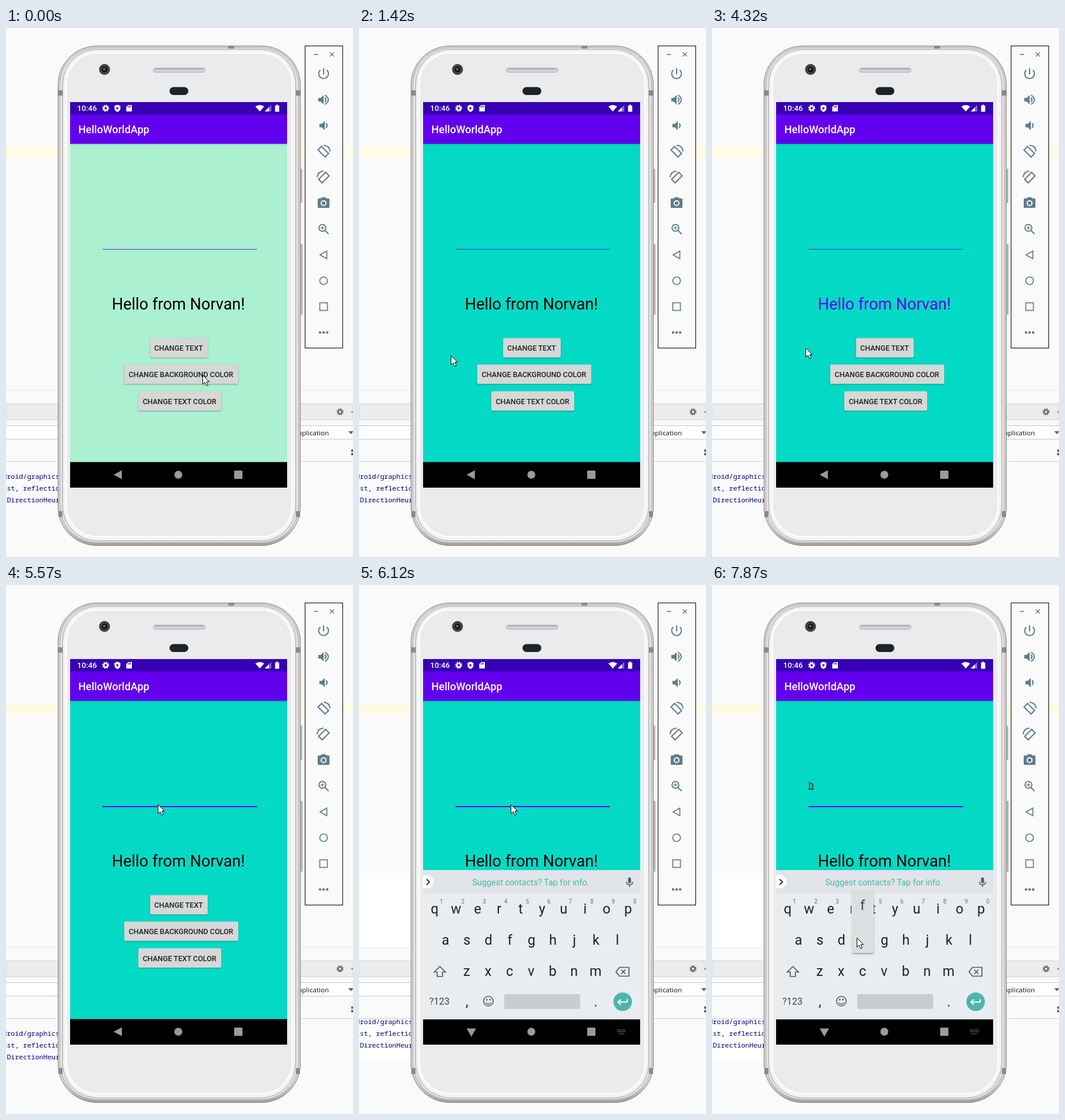
An HTML page that plays this animation: 590 px wide and 900 px high, repeating every 7.99 s.

```html
<!DOCTYPE html>
<html lang="en">
<head>
<meta charset="utf-8">
<title>HelloWorldApp</title>
<style>
html, body { margin: 0; width: 100%; height: 100%; overflow: hidden; background: #fafafa; }
svg { display: block; width: 590px; height: 900px; }
text { font-family: Roboto, sans-serif; white-space: pre; }
.mid { text-anchor: middle; }
.bold { font-weight: 500; }
.line { fill: none; stroke-width: 2; }
.code text { font: 500 11.5px "Noto Sans Mono", monospace; fill: #000080; }
.tools { fill: #607d8b; stroke: #607d8b; stroke-width: 0; }
.tools .line { fill: none; stroke-width: 2; }
.btn text { font-size: 12.5px; font-weight: 500; fill: #212121; text-anchor: middle; }
.keys text { font-size: 23.3px; fill: #14242c; text-anchor: middle; }
.keys .digit { font-size: 10px; fill: #667177; }
#typed { text-decoration: underline 1px; text-underline-offset: 2px; }
</style>
</head>
<body>
<svg viewBox="0 0 590 900">
  <defs>
    <g id="gear" fill="none" stroke="currentColor">
      <circle r="3.3" stroke-width="2.6"/>
      <circle r="5" stroke-width="2" stroke-dasharray="2 1.927"/>
    </g>
    <g id="rotate">
      <path class="line" d="M-3.500 -8.500L8.500 3.500L2.500 9.500L-9.500 -2.500Z"/>
      <path class="line" d="M0 -10.500Q10 -10 11 0"/>
    </g>
    <path id="speaker" d="M-7 -3h4l5 -5v16l-5 -5h-4z"/>
    <filter id="soft" x="-20%" y="-20%" width="140%" height="150%"><feGaussianBlur stdDeviation="1"/></filter>
    <filter id="softer" x="-20%" y="-20%" width="140%" height="160%"><feGaussianBlur stdDeviation="2.2"/></filter>
    <linearGradient id="fade" x2="0" y2="1"><stop stop-opacity=".18"/><stop offset="1" stop-opacity="0"/></linearGradient>
    <linearGradient id="rim" x2="0" y2="1"><stop offset=".96" stop-color="#d5d1d1"/><stop offset="1" stop-color="#a5a0a0"/></linearGradient>
    <clipPath id="console"><rect y="738" width="100" height="162"/></clipPath>
  </defs>

  <!-- editor behind the phone -->
  <rect width="590" height="900" fill="#fafafa"/>
  <rect y="202" width="590" height="18" fill="#fffae3"/>
  <g id="pane" fill="#fff"><rect y="490" width="95" height="126"/><rect y="738" width="100" height="69"/></g>
  <rect y="616" width="590" height="1" fill="#e8e8e8"/>
  <rect y="639.5" width="590" height="27" fill="#ececec" stroke="#d0d0d0"/>
  <rect x="-5" y="676.5" width="600" height="23" fill="#fff" stroke="#c6c6c6"/>
  <rect y="737" width="590" height="1" fill="#d0d0d0"/>
  <use href="#gear" x="568" y="653" color="#6e6e6e"/>
  <path d="M587 652.500h3v1.500h-3zM582 686h9l-4.500 5zM587 717h3v4h-3zM587 723h3v4h-3z" fill="#5f5f5f"/>
  <text x="549" y="693" text-anchor="end" font-size="11.500" style="font-family:'Open Sans',sans-serif" fill="#111">Application</text>
  <g clip-path="url(#console)"><g id="code" class="code">
    <text x="-5.500" y="767">droid/graphics</text>
    <text x="-5.500" y="787">ist, reflectio</text>
    <text x="-5.500" y="807">tDirectionHeur</text>
  </g></g>

  <!-- phone body -->
  <path d="M500 240h3v57h-3zM500 368h3.500v119h-3.500z" fill="#bdb9b9" stroke="#8b8787" stroke-width=".7"/>
  <rect x="88.500" y="30.500" width="412" height="850" rx="66" fill="url(#rim)" stroke="#8a8585"/>
  <rect x="91.500" y="33.500" width="406" height="842" rx="63" fill="#e2dfdf" stroke="#b5b0b0"/>
  <rect x="96.500" y="36.500" width="396" height="836" rx="59" fill="#f3f3f4" stroke="#aaa6a6"/>
  <rect x="102.500" y="42.500" width="384" height="823" rx="53" fill="#e9ebed" stroke="#fff" stroke-width="2"/>
  <path d="M89 106h7v9h-7zM493 106h7v9h-7zM89 822h7v10h-7zM493 822h7v10h-7zM378 31h10v4h-10z" fill="#8d8989"/>
  <circle cx="167.500" cy="70.500" r="9.300" fill="#3a3b3d"/>
  <circle cx="167.500" cy="70.500" r="6" fill="#18191b" stroke="#66686b"/>
  <circle cx="167" cy="70" r="2.200" fill="#5d6668"/>
  <rect x="250.500" y="68" width="88" height="7.500" rx="3.700" fill="#d0d1d5" stroke="#b4b5ba"/>
  <path d="M253 69.500h83" stroke="#94959b"/>
  <rect x="278" y="100.500" width="32" height="13.500" rx="6.700" fill="#1f2326"/>

  <!-- app -->
  <rect id="page" x="109" y="197" width="369" height="542"/>
  <rect x="109" y="197" width="369" height="3" fill="url(#fade)"/>
  <rect x="109" y="126" width="369" height="21" fill="#3700b3"/>
  <rect x="109" y="147" width="369" height="50" fill="#6200ee"/>
  <g fill="#fff">
    <text x="121" y="141" font-size="13.200" class="bold">10:46</text>
    <text x="123" y="179" font-size="18" class="bold">HelloWorldApp</text>
    <use href="#gear" x="169.500" y="136.500" color="#fff"/>
    <path d="M189.500 130.500l5 2v4q0 4.500 -5 6.500q-5 -2 -5 -6.500v-4z"/>
    <path d="M188 134l4 2.600l-4 2.600z" fill="#3700b3"/>
    <path d="M208 131h6v11h-9.500v-7.500z"/>
    <path d="M207.500 133v2.500M209.500 132v3.500M211.500 132v3.500" stroke="#3700b3"/>
    <path d="M424 133.500q7.500 -5 15 0l-7.500 8.500z"/>
    <path d="M451 131v11h-11z" opacity=".4"/><path d="M447 135v7h-7z"/>
    <path d="M457.500 132h2v-1.500h3v1.500h2v10.500h-7z"/>
  </g>
  <rect id="rule" x="164" y="376" width="263" fill="#6200ee"/>
  <text id="typed" x="164" y="345.500" font-size="16.200" fill="#212121">h</text>
  <text id="hello" x="179.900" y="479" font-size="27">Hello from Norvan!</text>
  <g id="buttons"></g>

  <!-- navigation bar -->
  <rect x="109" y="738.500" width="369" height="43.500" fill="#000"/>
  <g fill="#9a9a9a">
    <path id="back" d="M183 760l14 -7.500v15z"/>
    <path id="down" d="M183 754.500h16l-8 14z"/>
    <circle cx="293" cy="760" r="6.700"/>
    <rect x="388" y="753" width="14" height="14" rx="1"/>
    <path id="switch" d="M439.500 757h14M439.500 760h14M442 763.500h9" stroke="#8a8a8a" stroke-width="1.600" stroke-dasharray="1.600 1.400"/>
  </g>

  <!-- keyboard -->
  <g id="keyboard">
    <rect x="109" y="485" width="369" height="254" fill="#e9edf0"/>
    <rect x="109" y="485" width="369" height="40" fill="#e1e4e8"/>
    <path d="M109 494h7a11 11 0 0 1 0 22h-7z" fill="#fff"/>
    <path class="line" d="M115 500.500l4.800 4.800l-4.800 4.800" stroke="#263238"/>
    <text class="mid" x="292" y="511" font-size="14.370" fill="#46b5a7">Suggest contacts? Tap for info.</text>
    <g stroke="#4f5b62" class="line">
      <rect x="457.500" y="497.500" width="5" height="10" rx="2.500" fill="#4f5b62" stroke="none"/>
      <path d="M454.700 505q0 5 5.300 5t5.300 -5M460 510v3.500" stroke-width="1.600"/>
      <path d="M137.500 649l-9.500 9.500h5v7.500h9v-7.500h5z" stroke-width="1.700"/>
      <path d="M443 650.500h16v15h-16l-6 -7.500zM446 654.500l7 7M453 654.500l-7 7" stroke-width="1.700"/>
      <circle cx="220" cy="708" r="8.200" stroke-width="1.600"/>
      <path d="M215.500 710.500q4.500 5 9 0" stroke-width="1.600"/>
      <path d="M216 705.500h2.500M221.500 705.500h2.500" stroke-width="2.500"/>
    </g>
    <rect x="247" y="696" width="129" height="25.500" rx="2.500" fill="#c8cdd1"/>
    <circle cx="448.300" cy="709" r="15.800" fill="#4db6ac"/>
    <path class="line" d="M456 704.500v5h-15M445 705l-4.500 4.500l4.500 4.500" stroke="#fff"/>
    <text x="119.500" y="714" font-size="16" fill="#37474f">?123</text>
    <g id="keys" class="keys"></g>
  </g>
  <g id="popup" class="keys">
    <rect id="popShade" x="-18" width="37" rx="3" fill="#000" opacity=".3" filter="url(#soft)"/>
    <rect id="popBox" x="-19" width="38" rx="3" fill="#dcdee0"/>
    <text id="popKey" y="553" style="fill:#42474a"></text>
  </g>

  <!-- emulator toolbar -->
  <rect x="508.500" y="30.500" width="64" height="514" fill="#fafafa" stroke="#000"/>
  <path class="line" d="M523.500 45h7M550.500 41.500l7 7M557.500 41.500l-7 7" stroke="#607078" style="stroke-width:1.300"/>
  <g class="tools">
    <g transform="translate(540 78)"><path class="line" d="M0 -9.500V1M-5.500 -6.500A8.300 8.300 0 1 0 5.500 -6.500"/></g>
    <g transform="translate(538 122)"><use href="#speaker"/><path class="line" d="M4 -4q4 4 0 8M4.500 -8q11 8 0 16"/></g>
    <g transform="translate(540 166)"><use href="#speaker"/><path class="line" d="M4 -4q4 4 0 8"/></g>
    <use href="#rotate" transform="translate(540 210)"/>
    <use href="#rotate" transform="translate(540 254) scale(-1 1)"/>
    <g transform="translate(540 298)">
      <path d="M-10 -6.500q0 -1.500 1.500 -1.500h3.500l2 -2h6l2 2h3.500q1.500 0 1.500 1.500v13q0 1.500 -1.500 1.500h-17q-1.500 0 -1.500 -1.500z"/>
      <circle r="4.100" fill="#607d8b" style="stroke:#fafafa;stroke-width:2"/>
    </g>
    <g transform="translate(538 340)"><circle class="line" r="5.800"/><path class="line" d="M4.500 4.500l6 6"/><path class="line" d="M-3 0h6M0 -3v6" style="stroke-width:1.300"/></g>
    <path class="line" d="M534 386l11.500 -6.500v13z" style="stroke-width:1.700"/>
    <circle class="line" cx="540" cy="430" r="6.500" style="stroke-width:1.700"/>
    <rect class="line" x="533.500" y="467.500" width="13" height="13" style="stroke-width:1.700"/>
    <circle cx="534" cy="518" r="2.200"/><circle cx="540" cy="518" r="2.200"/><circle cx="546" cy="518" r="2.200"/>
  </g>

  <path id="cursor" d="M.5 .5V16.200L4.200 12.800L6.800 18.600L9.500 17.400L6.900 11.800H11.600Z" fill="#fff" stroke="#000"/>
</svg>
<script>
const LOOP = 7990;
const $ = id => document.getElementById(id);
const set = (id, attrs) => { for (const k in attrs) $(id).setAttribute(k, attrs[k]); };
const show = (id, on) => set(id, { display: on ? 'inline' : 'none' });

const button = (id, label, x, y, w) => `<g class="btn">
  <rect id="${id}Shade" x="${x}" y="${y + 1}" width="${w}" height="33" rx="2" opacity=".32" filter="url(#soft)"/>
  <rect id="${id}" x="${x}" y="${y}" width="${w}" height="33" rx="2" fill="#d6d7d7"/>
  <text x="${x + w / 2 - .5}" y="${y + 21.5}">${label}</text></g>`;
$('buttons').innerHTML =
  button('words', 'CHANGE TEXT', 245, 527.5, 98) +
  button('back-color', 'CHANGE BACKGROUND COLOR', 201, 572.5, 194) +
  button('ink', 'CHANGE TEXT COLOR', 225, 618, 141);

const STEP = 36.55;
const row = (chars, x, y, cls = '') => [...chars].map((c, i) =>
  `<text class="${cls}" x="${x + i * STEP}" y="${y}">${c}</text>`).join('');
$('keys').innerHTML = row('qwertyuiop', 128.5, 559) + row('1234567890', 140, 541.5, 'digit') +
  row('asdfghjkl', 147, 612) + row('zxcvbnm', 183, 665) + row(',', 183.5, 717) + row('.', 402.5, 717);

// Each entry: start time, pointer x, pointer y
const pointer = [
  [0, 334, 590], [150, 333, 590], [680, 331, 587], [830, 167, 557], [980, 156, 557],
  [2380, 179, 566], [2530, 300, 626], [2680, 301, 627], [2830, 302, 630], [2980, 302, 634],
  [3810, 298, 632], [3960, 268, 612], [4080, 205, 572], [4200, 168, 549], [4320, 159, 544],
  [5030, 165, 530], [5180, 205, 430], [5300, 248, 357], [5420, 258, 372], [5570, 258, 373],
  [6430, 275, 420], [6550, 325, 520], [6670, 346, 568], [6790, 328, 580],
  [6940, 327, 585], [7060, 326, 588], [7210, 328, 594], [7330, 333, 601], [7450, 335, 605],
  [7750, 290, 603], [7870, 246, 600]
];
const current = (track, t) => track.findLast(k => k[0] <= t);

function draw(t) {
  const [, x, y] = current(pointer, t);
  set('cursor', { transform: `translate(${x} ${y})` });
  set('page', { fill: t < 1420 ? '#aaf0d1' : '#03dac5' });
  set('hello', { fill: t >= 2980 && t < 4750 ? '#6200ee' : '#000' });

  const lifted = t >= 2980 && t < 3100;
  set('ink', { fill: lifted ? '#bdbdbd' : t >= 3100 && t < 3250 ? '#c6c7c7' : '#d6d7d7' });
  set('inkShade', { filter: lifted ? 'url(#softer)' : 'url(#soft)', y: lifted ? 621 : 619 });

  const focused = t >= 5570;
  set('rule', { height: focused ? 2 : 1, opacity: focused ? 1 : .8 });

  const open = t >= 6000, sliding = t < 6120;
  for (const id of ['keyboard', 'down', 'switch', 'pane']) show(id, open);
  show('back', !open);
  set('keyboard', { transform: `translate(0 ${sliding ? 7 : 0})`, opacity: sliding ? .87 : 1 });
  set('code', { transform: `translate(0 ${open ? -20 : 0})` });

  show('typed', t >= 7750);
  const key = t >= 7870 ? 'f' : t >= 7600 && t < 7750 ? 'h' : '';
  show('popup', key);
  if (key) {
    const top = key === 'f' ? 518.5 : 524;
    set('popup', { transform: `translate(${key === 'f' ? 256 : 330} 0)` });
    set('popBox', { y: top, height: 626 - top });
    set('popShade', { y: top + 2, height: 626 - top });
    $('popKey').textContent = key;
  }
}

const start = performance.now();
function tick() {
  draw((performance.now() - start) % LOOP);
  requestAnimationFrame(tick);
}
tick();
</script>
</body>
</html>
```
